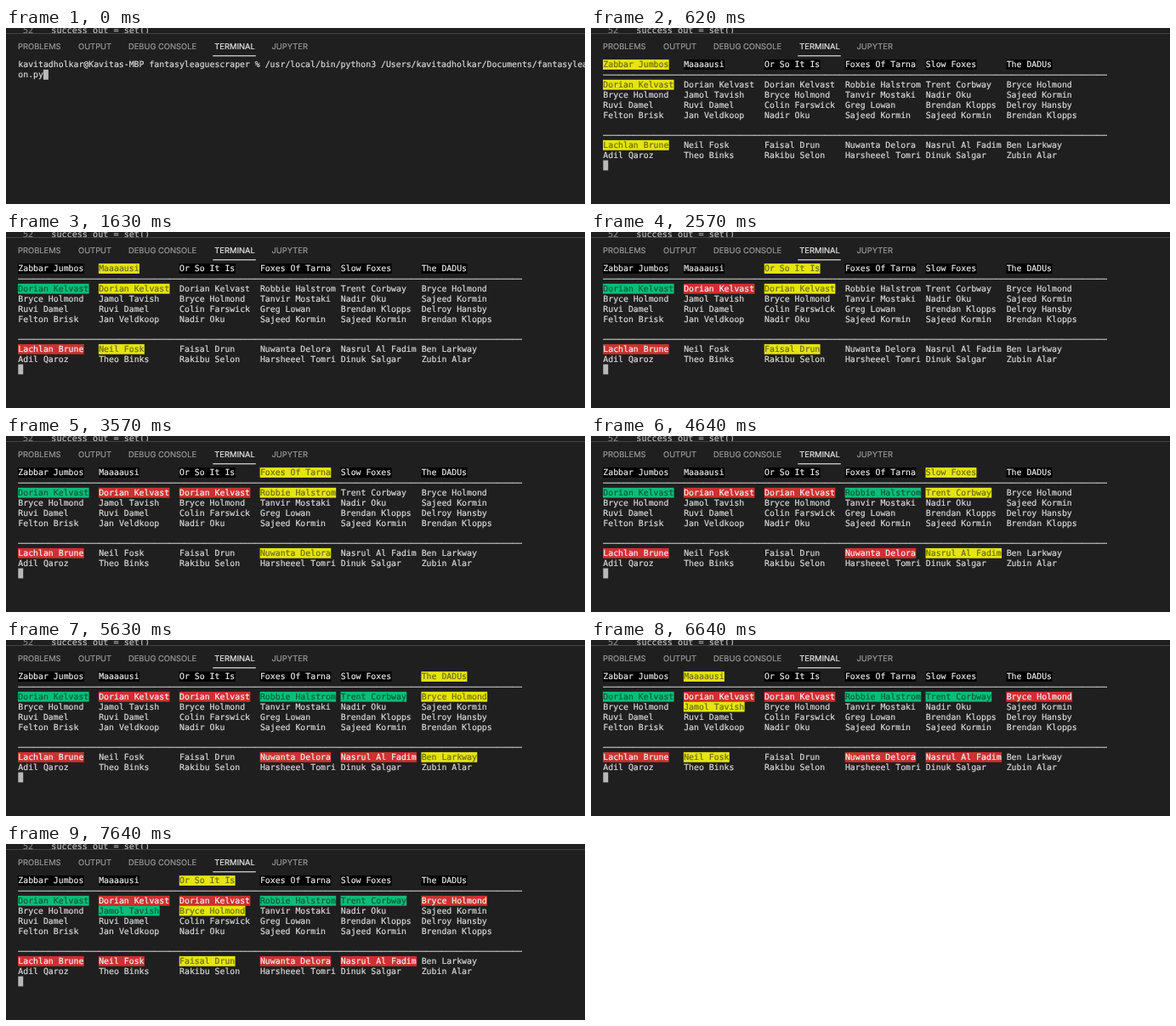
An HTML page that plays this animation: 681 px wide and 207 px high, repeating every 8 s.

```html
<!DOCTYPE html>
<html lang="en">
<head>
<meta charset="utf-8">
<title>Draft terminal</title>
<style>
  html, body { margin: 0; width: 100%; height: 100%; overflow: hidden; background: #1f1f1f; }
  svg { display: block; }
  text {
    white-space: pre; text-rendering: geometricPrecision;
    fill: currentColor; stroke: currentColor; stroke-width: .2;
  }
  .mono { font: 9.85px "DejaVu Sans Mono", monospace; color: #d8d8d8; }
  .code { font: 10.13px "DejaVu Sans Mono", monospace; color: #bcbcbc; }
  .tab { font: 9.35px Inter, "Liberation Sans", sans-serif; color: #989898; }
  .tab.on { color: #e7e7e7; }
</style>
</head>
<body>
<svg id="stage" width="681" height="207" viewBox="0 0 681 207"></svg>
<script>
const LOOP = 8000;
const LEFT = 14.3, TOP = 37.1, CHAR = 5.93, LINE = 11.85, COL = 16 * CHAR;

const TEAMS = ["Zabbar Jumbos", "Maaaausi", "Or So It Is", "Foxes Of Tarna", "Slow Foxes", "The DADUs"];
const PICKS = [
  ["Dorian Kelvast", "Dorian Kelvast", "Dorian Kelvast", "Robbie Halstrom", "Trent Corbway", "Bryce Holmond"],
  ["Bryce Holmond", "Jamol Tavish", "Bryce Holmond", "Tanvir Mostaki", "Nadir Oku", "Sajeed Kormin"],
  ["Ruvi Damel", "Ruvi Damel", "Colin Farswick", "Greg Lowan", "Brendan Klopps", "Delroy Hansby"],
  ["Felton Brisk", "Jan Veldkoop", "Nadir Oku", "Sajeed Kormin", "Sajeed Kormin", "Brendan Klopps"]
];
const DROPS = [
  ["Lachlan Brune", "Neil Fosk", "Faisal Drun", "Nuwanta Delora", "Nasrul Al Fadim", "Ben Larkway"],
  ["Adil Qaroz", "Theo Binks", "Rakibu Selon", "Harsheeel Tomri", "Dinuk Salgar", "Zubin Alar"]
];

const STYLES = {
  plain: ["none", "#d8d8d8"],
  head: ["#000", "#e8e8e8"],
  active: ["#e5e510", "#6c6c10"],
  won: ["#0dbc79", "#085c3e"],
  lost: ["#cd3131", "#f2f2f2"]
};

// Each turn: start, team, pick row, whether the claim succeeds
const TURNS = [
  [500, 0, 0, true],
  [1630, 1, 0, false],
  [2570, 2, 0, false],
  [3570, 3, 0, true],
  [4570, 4, 0, true],
  [5630, 5, 0, false],
  [6640, 1, 1, true],
  [7640, 2, 1, false]
];

function add(parent, tag, attrs, content) {
  const node = document.createElementNS("http://www.w3.org/2000/svg", tag);
  for (const key in attrs) node.setAttribute(key, attrs[key]);
  if (content) node.textContent = content;
  parent.appendChild(node);
  return node;
}

const rowY = row => TOP + row * LINE;

function print(parent, content, row, x = LEFT) {
  return add(parent, "text", { class: "mono", x, y: rowY(row) + 9.2 }, content);
}

function cursor(parent, row, column) {
  add(parent, "rect", {
    x: LEFT + column * CHAR, y: rowY(row), width: CHAR, height: LINE, fill: "#b8b8b8"
  });
}

function cell(parent, content, row, team) {
  const x = LEFT + team * COL;
  const back = add(parent, "rect", {
    x: x - 0.3, y: rowY(row), width: content.length * CHAR + 0.6, height: LINE
  });
  const label = print(parent, content, row, x);
  return name => {
    const [fill, ink] = STYLES[name];
    back.setAttribute("fill", fill);
    label.style.color = ink;
  };
}

const stage = document.getElementById("stage");
add(stage, "rect", { width: 681, height: 207, fill: "#1f1f1f" });

// Editor edge and panel tabs
add(stage, "text", { class: "code", x: 20, y: 6.2, style: "color:#858585" }, "52");
add(stage, "text", { class: "code", x: 53.3, y: 6.2 }, "success_out = set()");
add(stage, "rect", { y: 6, width: 681, height: 201, fill: "#1f1f1f" });
add(stage, "rect", { y: 6, width: 681, height: 1, fill: "#444" });
[["PROBLEMS", 14], ["OUTPUT", 85], ["DEBUG CONSOLE", 144], ["TERMINAL", 245.3], ["JUPYTER", 312.5]]
  .forEach(([name, x]) => add(stage, "text", {
    class: name === "TERMINAL" ? "tab on" : "tab", x, y: 25.4
  }, name));
add(stage, "rect", { x: 243.3, y: 32, width: 50.5, height: 1.4, fill: "#c4c4c4" });

const command = add(stage, "g", {});
print(command, "kavitadholkar@Kavitas-MBP fantasyleaguescraper % " +
  "/usr/local/bin/python3 /Users/kavitadholkar/Documents/fantasylea", 0);
print(command, "on.py", 1);
cursor(command, 1, 5);

const table = add(stage, "g", {});
const row = (names, line) => names.map((name, team) => cell(table, name, line, team));
const heads = row(TEAMS, 0);
const picks = PICKS.map((names, i) => row(names, 2 + i));
const drops = DROPS.map((names, i) => row(names, 8 + i));
[1, 7].forEach(line => print(table, "—".repeat(100), line));
cursor(table, 10, 0);

function draw(time) {
  const turns = TURNS.filter(turn => turn[0] <= time);
  command.style.display = turns.length ? "none" : "";
  table.style.display = turns.length ? "" : "none";

  heads.forEach(paint => paint("head"));
  [...picks, ...drops].flat().forEach(paint => paint("plain"));
  turns.forEach(([, team, round, wins], i) => {
    const current = i === turns.length - 1;
    if (current) heads[team]("active");
    picks[round][team](current ? "active" : wins ? "won" : "lost");
    drops[0][team](current ? "active" : wins ? "lost" : "plain");
  });
}

const start = performance.now();
function tick() {
  draw((performance.now() - start) % LOOP);
  requestAnimationFrame(tick);
}
tick();
</script>
</body>
</html>
```
